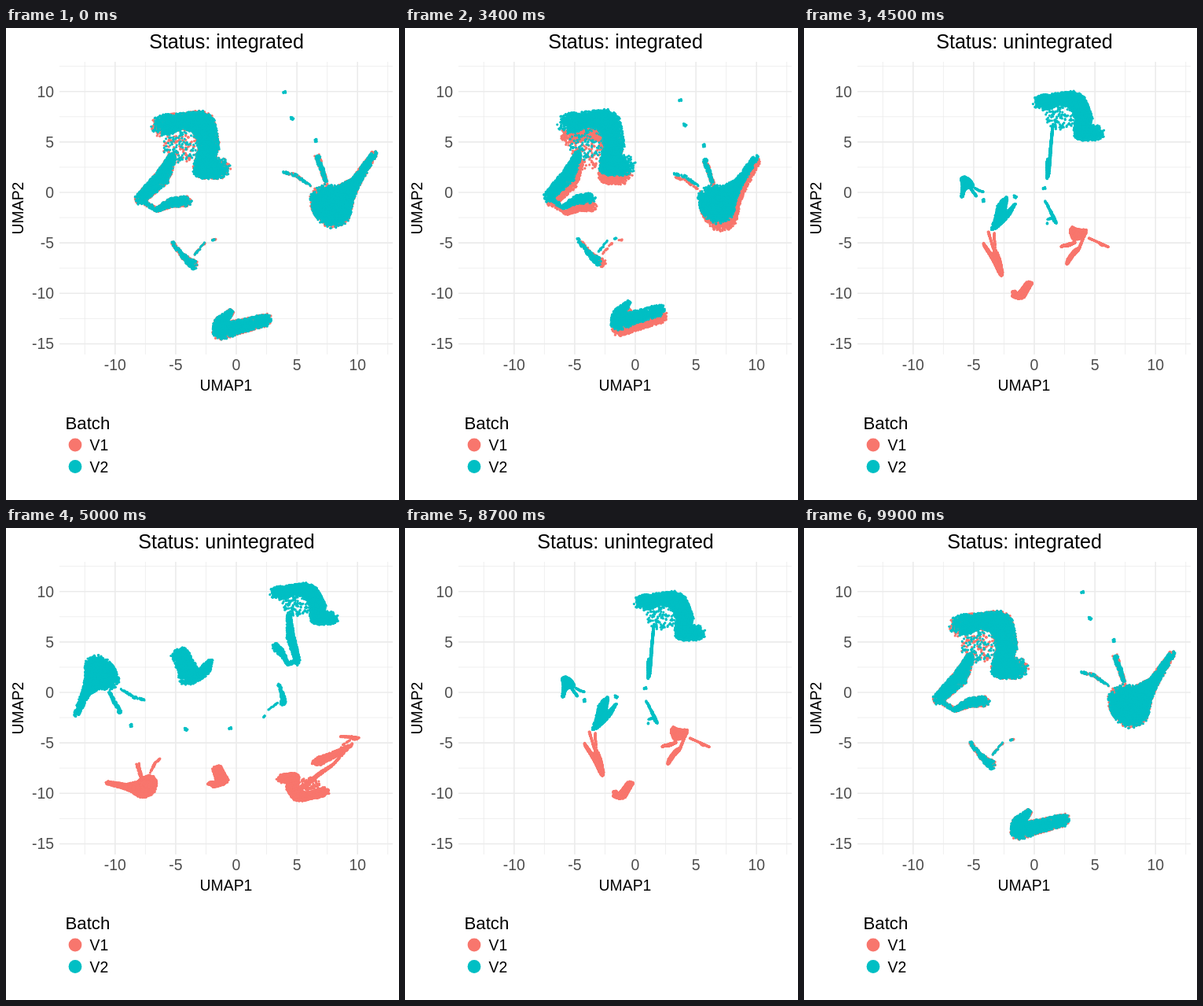
These frames come from a looping animation (500x600 px, 10 s). An HTML page with a canvas:

```html
<!DOCTYPE html>
<html>
<head>
<meta charset="utf-8">
<style>
html, body { margin: 0; width: 500px; height: 600px; overflow: hidden; background: #fff; }
canvas { display: block; }
</style>
</head>
<body>
<canvas id="plot" width="500" height="600"></canvas>
<script>
const ctx = document.getElementById('plot').getContext('2d');
const RED = '#F8766D', TEAL = '#00BFC4';
const FONT = '"Liberation Sans", Arial, sans-serif';
const STEPS = 17;
const batches = { [RED]: [], [TEAL]: [] };

let seed = 7;
function random() {
  seed = (seed + 0x6D2B79F5) | 0;
  let t = Math.imul(seed ^ (seed >>> 15), 1 | seed);
  t = (t + Math.imul(t ^ (t >>> 7), 61 | t)) ^ t;
  return ((t ^ (t >>> 14)) >>> 0) / 4294967296;
}

const mix = (a, b, u) => a + (b - a) * u;
const clamp = v => Math.max(0, Math.min(STEPS, v));

// Random cells in the band between two discs [x, y, r]; thin bands are sparser.
function* band([x1, y1, r1], [x2, y2, r2], density = Math.min(0.48, 0.08 + 0.06 * Math.max(r1, r2))) {
  const rMax = Math.max(r1, r2) + 1;
  const area = Math.hypot(x2 - x1, y2 - y1) * (r1 + r2 + 2) + Math.PI * rMax ** 2;
  for (let i = 0; i < density * area; i++) {
    const u = random(), angle = random() * 2 * Math.PI;
    const d = mix(r1, r2, u) * Math.sqrt(random());
    yield [mix(x1, x2, u) + d * Math.cos(angle), mix(y1, y2, u) + d * Math.sin(angle)];
  }
}

// Both batches share the integrated chains of discs; each batch then gets
// its own affine map about the origin: [x, y, xx, xy, yx, yy].
function cluster({ origin: [ox, oy], teal, red, chains, haze }) {
  for (const [color, [tx, ty, xx, xy, yx, yy]] of [[RED, red], [TEAL, teal]]) {
    const add = cells => {
      for (const [x, y] of cells) {
        const dx = x - ox, dy = y - oy;
        batches[color].push([x, y, tx + xx * dx + xy * dy, ty + yx * dx + yy * dy]);
      }
    };
    for (const chain of chains) {
      for (let i = 1; i < chain.length; i++) add(band(chain[i - 1], chain[i]));
    }
    if (haze) add(band(haze, haze, 0.06));
  }
}

// Arch
cluster({
  origin: [197, 125],
  teal: [345, 84, 0.76, 0.2, -0.04, 0.62],
  red: [404, 335, -0.6, -0.12, 0.08, -0.42],
  chains: [[[197, 124, 14], [225, 118, 10], [250, 120, 16], [259, 150, 13], [249, 180, 12], [272, 178, 14]]],
  haze: [222, 150, 23],
});

// Leg and foot
cluster({
  origin: [205, 170],
  teal: [362, 118, -0.47, -0.16, -0.33, 0.82],
  red: [400, 292, -0.93, 0.06, 0.8, 0.32],
  chains: [
    [[212, 163, 5], [199, 190, 10], [170, 218, 7]],
    [[176, 222, 3], [192, 231, 3], [210, 222, 6], [230, 220, 7]],
  ],
});

// Round body with an arm, a spike and a strand
cluster({
  origin: [412, 225],
  teal: [123, 185, -0.78, -0.16, 0, -0.8],
  red: [178, 328, -0.52, 0.3, 0.34, 0.36],
  chains: [
    [[408, 219, 22], [416, 231, 24], [428, 214, 15], [444, 197, 7], [469, 159, 4]],
    [[396, 163, 4], [407, 195, 2]],
    [[352, 183, 1], [368, 187, 2], [388, 201, 1]],
  ],
});

// Bottom wedge
cluster({
  origin: [273, 386],
  teal: [236, 192, -0.58, -1.19, -0.42, 0.68],
  red: [276, 323, 0.04, 0.7, -0.38, -0.25],
  chains: [[[286, 361, 4], [272, 375, 8], [273, 386, 11], [300, 379, 9], [332, 371, 8]]],
});

// Small body with two tails
cluster({
  origin: [228, 293],
  teal: [352, 213, -0.32, 0.51, 0.79, 0.07],
  red: [440, 266, 0.06, 0.65, 0.26, -0.16],
  chains: [
    [[212, 273, 2], [225, 290, 3], [239, 301, 6]],
    [[240, 288, 1], [254, 272, 1]],
    [[262, 270, 1], [267, 268, 1]],
  ],
});

// Isolated specks
for (const [x, y, toX, toY] of [[394, 143, 159, 251], [364, 115, 229, 256], [354, 81, 285, 254]]) {
  for (let i = 0; i < 6; i++) {
    const dx = 4 * random() - 2, dy = 4 * random() - 2;
    batches[TEAL].push([x + dx, y + dy, toX + dx, toY + dy]);
  }
}

function circle(x, y, r) {
  ctx.beginPath();
  ctx.arc(x, y, r, 0, 2 * Math.PI);
  ctx.fill();
}

function text(label, x, y, size, align = 'left', color = '#000') {
  ctx.font = `${size}px ${FONT}`;
  ctx.textAlign = align;
  ctx.fillStyle = color;
  ctx.fillText(label, x, y);
}

function line(x1, y1, x2, y2, width) {
  ctx.lineWidth = width;
  ctx.beginPath();
  ctx.moveTo(x1, y1);
  ctx.lineTo(x2, y2);
  ctx.stroke();
}

const axisX = v => 293 + v * 15.42;
const axisY = v => 209 - v * 12.83;

function drawAxes() {
  ctx.strokeStyle = '#EBEBEB';
  for (const [start, width] of [[-12.5, 0.8], [-15, 1.6]]) {
    for (let v = start; v <= 12.5; v += 5) {
      if (v > -15) line(axisX(v), 43, axisX(v), 415, width);
      line(68, axisY(v), 492, axisY(v), width);
    }
  }
  for (let v = -15; v <= 10; v += 5) {
    if (v > -15) text(v, axisX(v), 435, 19.4, 'center', '#4D4D4D');
    text(v, 61, axisY(v) + 7, 19.4, 'right', '#4D4D4D');
  }
  text('UMAP1', 280, 461, 19.4, 'center');
  ctx.save();
  ctx.translate(22, 229);
  ctx.rotate(-Math.PI / 2);
  text('UMAP2', 0, 0, 19.4, 'center');
  ctx.restore();
}

function drawLegend() {
  text('Batch', 75.5, 510, 22.2);
  [['V1', RED], ['V2', TEAL]].forEach(([label, color], i) => {
    text(label, 106.5, 537 + i * 27.5, 19.4);
    ctx.fillStyle = color;
    circle(88, 530 + i * 27.5, 8.4);
  });
}

function draw(step) {
  const p = step / STEPS;
  ctx.fillStyle = '#fff';
  ctx.fillRect(0, 0, 500, 600);
  drawAxes();
  for (const color of [RED, TEAL]) {
    ctx.fillStyle = color;
    for (const [x, y, toX, toY] of batches[color]) circle(mix(x, toX, p), mix(y, toY, p), 1.6);
  }
  text('Status: ' + (p < 0.5 ? 'integrated' : 'unintegrated'), 280.5, 26, 25.1, 'center');
  drawLegend();
}

let shown = -1;
function tick() {
  const frame = Math.floor(performance.now() / 100) % 100;
  const step = clamp(frame - 33) - clamp(frame - 82);
  if (step !== shown) draw(shown = step);
  requestAnimationFrame(tick);
}
tick();
</script>
</body>
</html>
```
